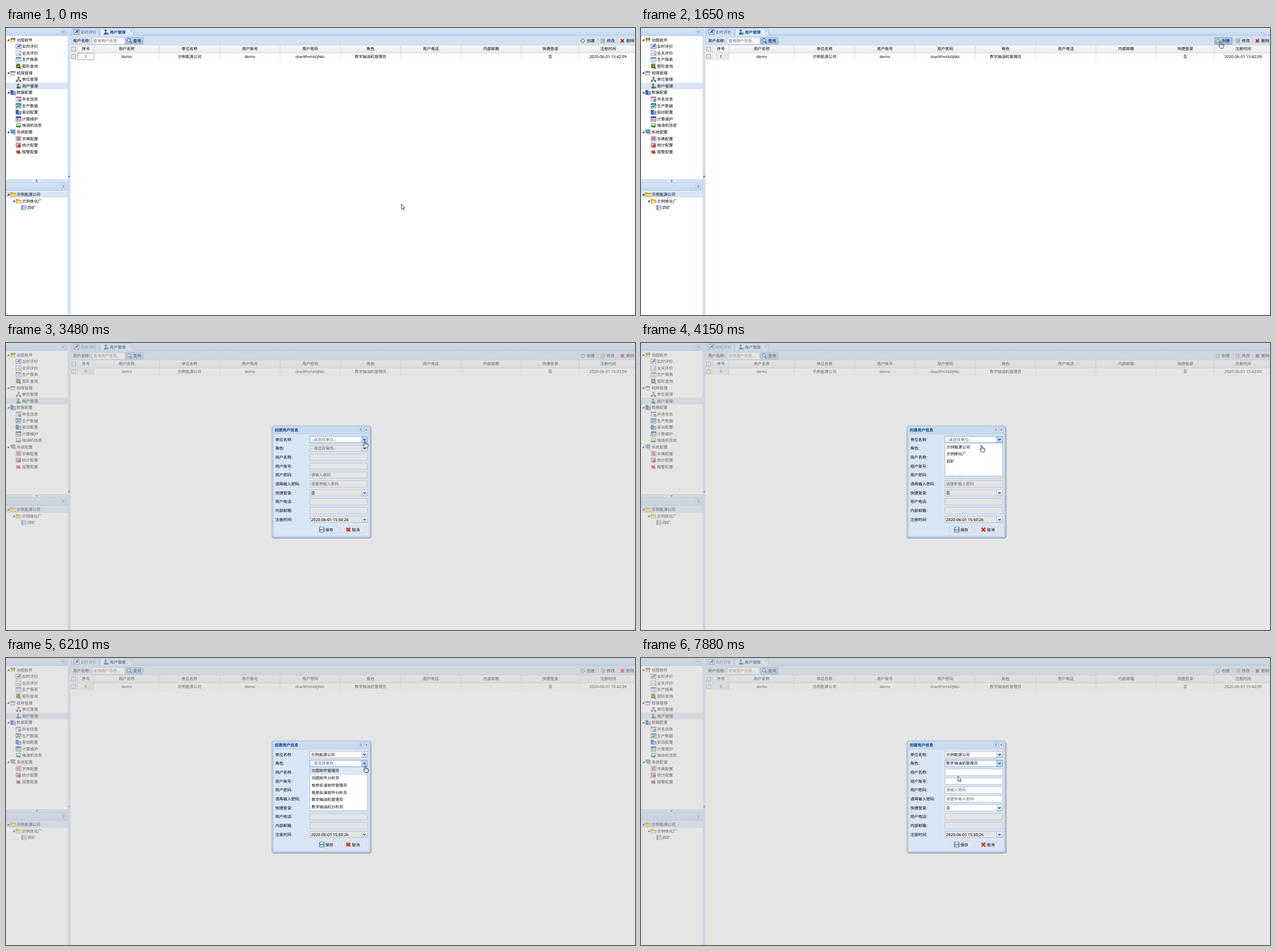
An HTML page that plays this animation: 1106x506 px, repeating every 8000 ms.

```html
<!DOCTYPE html>
<html lang="zh-CN">
<head>
<meta charset="utf-8">
<title>用户管理</title>
<style>
  html, body { margin: 0; width: 100%; height: 100%; overflow: hidden; background: #fff; }
  svg { display: block; }
  text { font: 6.96px "Noto Sans", "Noto Sans CJK SC", "Noto Sans CJK", sans-serif; fill: #000; white-space: pre; text-rendering: geometricPrecision; }
  .bold { font-weight: 700; }
  .mid { text-anchor: middle; }
  .hint { fill: #666; }
  .title { fill: #04408c; font-weight: 700; }
  .tab { fill: #2f5f9c; }
  .small { font-size: 6.5px; }
</style>
</head>
<body>
<svg id="stage" width="1106" height="506" viewBox="0 0 1106 506">
  <defs>
    <linearGradient id="bar" x2="0" y2="1"><stop stop-color="#d6e4f6"/><stop offset="1" stop-color="#c6d9f0"/></linearGradient>
    <linearGradient id="head" x2="0" y2="1"><stop stop-color="#fbfbfb"/><stop offset="1" stop-color="#e9eaec"/></linearGradient>
    <linearGradient id="num" x2="1" y2="0"><stop stop-color="#f7f7f7"/><stop offset="1" stop-color="#e4e5e7"/></linearGradient>
    <linearGradient id="press" x2="0" y2="1"><stop stop-color="#b6d0ee"/><stop offset="1" stop-color="#a0c2e9"/></linearGradient>
    <linearGradient id="trig" x2="0" y2="1"><stop stop-color="#fafcfe"/><stop offset="1" stop-color="#c3d4ea"/></linearGradient>
    <clipPath id="freshClip"><rect id="fresh" x="530" y="160" width="112" height="0"/></clipPath>
  </defs>
</svg>
<script>
const LOOP = 8000;
const stage = document.getElementById('stage');
const COMPANY = '示例能源公司', PLANT = '示例炼化厂', ACCOUNT = 'demo';

const rect = (x, y, w, h, fill, stroke, extra = '') =>
  `<rect x="${x}" y="${y}" width="${w}" height="${h}" fill="${fill}" ${stroke ? `stroke="${stroke}" stroke-width=".7"` : ''} ${extra}/>`;
const text = (x, cy, s, cls = '', extra = '') => `<text x="${x}" y="${cy + 2.5}" class="${cls}" ${extra}>${s}</text>`;
const path = (d, fill, stroke = 'none', w = 1) => `<path d="${d}" fill="${fill}" stroke="${stroke}" stroke-width="${w}"/>`;
const group = (id, body, extra = '') => `<g id="${id}" ${extra}>${body}</g>`;

// Icons live in a 10 x 10 box.
const sheet = color => rect(.5, .8, 9, 8.4, '#fff', color);
const art = {
  live: sheet('#1f3f9c') + path('M1.5 8C3 3 6 1 9 1.5L7 5Z', '#2462d4') + path('M5 6L8 4 7.5 8Z', '#e05038'),
  day: sheet('#4a74b4') + path('M1.5 8L4 4.5 5.5 6 8.5 2', 'none', '#c8782a') + rect(5.5, 6, 4, 3.5, '#e5a840'),
  report: sheet('#3a74b8') + rect(.5, .8, 9, 2.4, '#4a90d8') + path('M2 5H8M2 7H8', 'none', '#7fa6d2'),
  find: rect(1, .5, 7, 8, '#e0a83c', '#6a5420') + '<circle cx="4.6" cy="5" r="2.8" fill="#6fb45c" stroke="#222"/>' + path('M6.5 7L9.3 9.7', 'none', '#222', 1.3),
  soft: rect(.5, 1, 3.6, 4, '#ee4424') + rect(.5, 5, 3.6, 4, '#f3c020') + path('M7 9V3M5 4L7 1 9 4Z', '#2f8f2f', '#2f8f2f', 1.2),
  rights: rect(.5, 2.5, 7, 6.5, '#f4f7fc', '#33568f') + rect(.5, 2.5, 7, 2, '#4674bf') + path('M5 4.5L9.5 1V5Z', '#dd9526'),
  org: rect(3.4, .5, 3.4, 3.2, '#bd3c24') + path('M5 4V6M2 7V5.6H8V7', 'none', '#333', .8) + rect(.3, 6.5, 3.4, 3, '#bd3c24') + rect(6.3, 6.5, 3.4, 3, '#2c55a0'),
  user: '<circle cx="4.3" cy="2.6" r="2" fill="#44698f"/>' + path('M1 9.5C1 4 8 4 8 9.5Z', '#33597f') + rect(6, 6, 3.5, 3.5, '#5f955b'),
  data: rect(.4, 1, 4.4, 7.5, '#3a68c8', '#1a388a') + rect(4.6, 3, 5, 6.3, '#dfe9fb', '#1a388a') + path('M5.5 5H9M5.5 7H9', 'none', '#2a54b0'),
  well: sheet('#5484c0') + rect(.5, .8, 9, 2.2, '#dc5444') + rect(4.8, 4.6, 4.8, 5, '#3aa2ce') + path('M2 5H4M2 7H4', 'none', '#8aa'),
  output: rect(.5, 1, 9, 8.3, '#eef4ee', '#1c3c64') + rect(.5, 1, 9, 2, '#264f8c') + path('M1.5 8L4 5 6 7 8.5 4', 'none', '#1f8632', 1.7),
  calc: rect(.6, .8, 8.8, 8.5, '#e7edfb', '#12226a') + rect(.6, .8, 8.8, 2.4, '#1a3899') + path('M2 5H5M2 7H5', 'none', '#264692') + rect(6, 5, 2.5, 3, '#e09a20'),
  pump: rect(1.5, 1, 7.5, 5, '#dcebdc', '#3b733b') + path('M.5 6H6V4.5L9.5 7.2 6 9.8V8.4H.5Z', '#2b8f2b'),
  system: rect(1, .8, 7.5, 5.5, '#5fa6e4', '#38506c') + rect(3, 6.5, 3.5, 1.4, '#6a7684') + path('M5 9.5L9.5 6V9.5Z', '#cc983a'),
  dict: sheet('#8f5a8a') + path('M1.5 2.8H8.5M1.5 5H8.5M1.5 7.2H8.5', 'none', '#c04058', 1.4) + path('M3.5 1V9M6.4 1V9', 'none', '#6a7ad0', .8),
  stats: rect(.6, 1, 8, 7.8, '#a0a9b6', '#6c7582') + '<circle cx="6.4" cy="6.3" r="3" fill="#d03a2e"/>' + rect(2, 2.5, 3, 2, '#e6eaf0'),
  alarm: path('M1 2L5 4 8 .8 7.5 5 9.5 7 6 9.5 4 7.5 1.5 9Z', '#d03a20') + rect(4.4, 3, 2.2, 3.2, '#2d4596') + rect(1, 7.2, 3, 2, '#e9a23a'),
  folder: path('M.4 1.8H4L5 3H9.6V9H.4Z', '#e5b53c', '#96731c', .7) + path('M.6 8.8L2 4.6H9.8L9 8.8Z', '#fadc74'),
  leaf: rect(1, 1, 8, 8, '#e9f0fb', '#4a70a8') + rect(1, 1, 2.6, 8, '#6d95ce') + path('M5 3.6H8M5 6H8', 'none', '#4a70a8'),
  lens: '<circle cx="4" cy="4" r="3" fill="#e3f1ff" stroke="#3a6cb0" stroke-width="1.2"/>' + path('M6.2 6.2L9.3 9.3', 'none', '#5b5030', 1.7),
  plus: path('M3.5 1H6.5V3.5H9V6.5H6.5V9H3.5V6.5H1V3.5H3.5Z', '#e9f6e2', '#4b8f45', 1.1),
  edit: rect(1, 1, 7, 8.4, '#f5f1dc', '#56688a') + path('M2.5 3.5H6M2.5 5.5H5', 'none', '#6880a8') + path('M4 8L8.8 2.4', 'none', '#c47e20', 1.7),
  cross: path('M1.6 1.6L8.4 8.4M8.4 1.6L1.6 8.4', 'none', '#cc2a1a', 2.7),
  save: rect(.5, .5, 9, 9, '#4b86d6', '#28569c', 'rx=".8"') + rect(2, .8, 6, 3.2, '#f2f7ff') + rect(1.8, 5.6, 6.4, 3.6, '#cfe3b4')
};
const icon = (name, cx, cy, size = 10) => `<g transform="translate(${cx - size / 2} ${cy - size / 2}) scale(${size / 10})">${art[name]}</g>`;

const tool = (cx, cy, d) => rect(cx - 4, cy - 4, 8, 8, '#e3edf9', '#8fb0da', 'rx="1.2"') +
  `<g transform="translate(${cx} ${cy})">${path(d, 'none', '#2f588c', .9)}</g>`;
const LEFT = 'M-.3 -2L-2.2 0 -.3 2M2.2 -2L.3 0 2.2 2', DOWN = 'M-2 -2.2L0 -.3 2 -2.2M-2 .3L0 2.2 2 .3';
const UP = 'M-2 -.3L0 -2.2 2 -.3M-2 2.2L0 .3 2 2.2', CLOSE = 'M-2 -2L2 2M2 -2L-2 2';

const opener = (x, y) => path(`M${x - 2} ${y + 1.8}H${x + 1.8}V${y - 2}Z`, '#222');
function node(depth, y, name, label, leaf) {
  const x = 12.5 + depth * 9.5;
  return (leaf ? '' : opener(x - 8.5, y)) + icon(name, x, y, 9.6) + text(x + 6.3, y, label);
}

const MENU = [
  ['soft', '功图软件'], ['live', '实时评价', 1], ['day', '全天评价', 1], ['report', '生产报表', 1], ['find', '图形查询', 1],
  ['rights', '权限管理'], ['org', '单位管理', 1], ['user', '用户管理', 1],
  ['data', '数据配置'], ['well', '井名信息', 1], ['output', '生产数据', 1], ['data', '驱动配置', 1], ['calc', '计算维护', 1], ['pump', '抽油机信息', 1],
  ['system', '系统配置'], ['dict', '字典配置', 1], ['stats', '统计配置', 1], ['alarm', '报警配置', 1]
];

function sidebar() {
  const line = '#99bce8';
  return rect(0, 0, 112.5, 506, '#dfe9f6') + rect(0, 0, 109, 506, '#fff') +
    rect(0, 0, 109, 13.4, 'url(#bar)') + rect(0, 13, 109, .7, line) + tool(101, 6.8, LEFT) +
    rect(0, 96.4, 109, 11.6, '#dbe5f2') +
    MENU.map(([name, label, leaf], i) => node(leaf ? 1 : 0, 21 + i * 11.6, name, label, leaf)).join('') +
    rect(0, 267.6, 109, 4.4, '#dfe9f6') + rect(0, 267.4, 109, .7, line) +
    rect(45, 268.2, 18, 3, '#fff', '#c3d3e6') + path('M52 268.7H56L54 270.9Z', '#333') +
    rect(0, 272, 109, 14.8, 'url(#bar)') + rect(0, 271.6, 109, .7, line) + rect(0, 286.4, 109, .7, line) + tool(101, 279, DOWN) +
    rect(0, 287.6, 109, 11.6, '#d9e5f4') +
    node(0, 293.4, 'folder', COMPANY) + node(1, 305, 'folder', PLANT) + node(2, 316.6, 'leaf', '四矿', 1) +
    rect(108.8, 0, .7, 506, line) + rect(112, 0, .8, 506, line) + path('M111.6 260V264L109.6 262Z', '#333');
}

function tabs() {
  const shape = (x, w) => `M${x} 13V3Q${x} 1 ${x + 2} 1H${x + w - 2}Q${x + w} 1 ${x + w} 3V13`;
  return rect(112.5, 0, 994, 13, 'url(#bar)') + rect(112.5, 12.6, 994, 2.6, '#c9dcf2') + rect(112.5, 12.3, 994, .6, '#99bce8') +
    path(shape(116, 47.5), '#d3e2f5', '#8db2e3', .7) + icon('live', 124, 7) + text(131, 7, '实时评价', 'tab') +
    path(shape(165.5, 58.5), '#e0ecfa', '#8db2e3', .7) + icon('user', 176, 7) + text(182.5, 7, '用户管理', 'title') +
    path('M218.6 3.6L221.4 6.4M221.4 3.6L218.6 6.4', 'none', '#7b99bf', .8);
}

function toolbar() {
  const action = (x, name, label) => icon(name, x, 22.7, 8.4) + text(x + 7, 22.7, label);
  return rect(112.5, 15.2, 994, 15, '#d3e1f1') + text(118, 22.7, '用户名称:') +
    rect(151.3, 17, 57.5, 11.4, '#fff', '#b5b8c8') + text(153.5, 22.7, '查询用户信息...', 'hint') +
    rect(210.4, 16.8, 30.6, 11.8, 'url(#press)', '#7394c4', 'rx="1.3"') + icon('lens', 217, 22.5, 9) + text(223.5, 22.7, '查询') +
    group('createOver', rect(1008.6, 16.8, 30.6, 11.8, 'url(#press)', '#4f78b0', 'rx="1.3"')) +
    action(1014.3, 'plus', '创建') + action(1049.6, 'edit', '修改') + action(1083.8, 'cross', '删除') +
    rect(1041, 18, .7, 9, '#a9bfda') + rect(1075, 18, .7, 9, '#a9bfda');
}

const EDGES = [113, 126, 155, 269.5, 376, 482, 588, 694, 800, 906, 1008, 1110];
const HEADS = ['', '序号', '用户名称', '单位名称', '用户账号', '用户密码', '角色', '用户电话', '内部邮箱', '快捷登录', '注册时间'];
const CELLS = ['', '1', ACCOUNT, COMPANY, ACCOUNT, 'dow9Pmhb0JN6c', '数字抽油机管理员', '', '', '否', '2020-06-01 15:42:09'];

function grid() {
  const box = y => rect(115.5, y - 3.6, 7.2, 7.2, '#f6f6f6', '#777') + rect(117, y - 2.1, 4.2, 4.2, '#e3e5e8');
  let out = rect(112.8, 30, 994, 14, 'url(#head)') + rect(112.8, 29.8, 994, .7, '#c0c8d2') + rect(112.8, 43.7, 994, .7, '#c9c9c9') +
    rect(113, 44.3, 42, 12.2, 'url(#num)') + rect(112.8, 56.2, 994, .5, '#ededed') + box(37.2) + box(50.4) +
    group('cellFocus', rect(126.4, 44.6, 28.2, 11.4, '#fbfbfb', '#858585'));
  HEADS.forEach((head, i) => {
    const mid = i === 10 ? 1058.7 : (EDGES[i] + EDGES[i + 1]) / 2;
    out += rect(EDGES[i + 1] - .4, 30, .7, 14, '#c5c5c5') + rect(EDGES[i + 1] - .4, 44, .7, 12.4, '#d8d8d8') +
      text(mid, 36.8, head, 'mid') + text(mid, 50.2, CELLS[i], i === 5 ? 'mid small' : 'mid');
  });
  return out;
}

const FIELDS = [
  ['单位名称', '', 1], ['角色', '', 1], ['用户名称', ''], ['用户账号', ''], ['用户密码', '请输入密码'],
  ['请再输入密码', '请重新输入密码'], ['快捷登录', '否', 1], ['用户电话', ''], ['内部邮箱', ''], ['注册时间', '2020-06-01 15:50:26', 1]
];
const fieldY = i => 170.2 + i * 15.65;
const arrowDown = y => path(`M628.2 ${y - 1.2}L630.3 ${y + 1} 632.4 ${y - 1.2}`, 'none', '#1f3f6e', 1.3);
const focusRing = (id, i) => group(id, rect(534.4, fieldY(i) - 5.7, 101.2, 11.4, 'none', '#6fa0d8') +
  rect(625.6, fieldY(i) - 5.4, 9.7, 10.8, '#bfd8f5', '#6fa0d8') + arrowDown(fieldY(i)));

function dialog() {
  const boxes = fill => FIELDS.map((f, i) => rect(534.4, fieldY(i) - 5.7, 101.2, 11.4, fill, '#b0b7c6')).join('');
  const button = (x, w, name, label) => rect(x, 323, w, 12, '#dde6f1', '#ced9e7', 'rx="1.3"') + icon(name, x + 13, 329, 9.4) + text(x + 19.3, 329, label);
  return rect(468.5, 148, 174.5, 197, '#000', '', 'rx="4" opacity=".13"') + rect(467, 146.2, 175.5, 198.6, '#000', '', 'rx="4" opacity=".14"') +
    rect(467.9, 146, 173.2, 197, '#cbdaee', '#8ba5c8', 'rx="3"') + rect(470.5, 160.6, 168, 180, '#d9e6f5', '#b4c9e4') +
    text(472.3, 153.4, '创建用户信息', 'title') + tool(623.8, 153.2, UP) + tool(633.6, 153.2, CLOSE) +
    boxes('#e5e5e5') + group('freshFields', boxes('#fff'), 'clip-path="url(#freshClip)"') +
    FIELDS.map(([label, value, combo], i) => {
      const y = fieldY(i);
      return text(473.6, y, label + ':') + text(536.6, y, value, i === 4 || i === 5 ? 'hint' : '') +
        (combo ? rect(625.6, y - 5.4, 9.7, 10.8, 'url(#trig)', '#b0b7c6') + arrowDown(y) : '');
    }).join('') +
    focusRing('focusUnit', 0) + focusRing('focusRole', 1) +
    text(536.6, fieldY(0), '', '', 'id="unit"') + text(536.6, fieldY(1), '', '', 'id="role"') +
    button(542.3, 42, 'save', '保存') + button(589, 43, 'cross', '取消');
}

const ROW = 12.75;
const list = (id, top, height, items) => group(id, rect(534.4, top, 101.2, height, '#fff', '#8fb3dc') +
  rect(534.9, top + .4, 100.2, ROW, '#dfe8f6', '#b3cdec', `id="${id}Hover"`) +
  items.map((s, i) => text(537.2, top + 6.8 + i * ROW, s)).join(''));

const cursors =
  group('arrow', path('M.3 .3V9.4L2.4 7.5 3.9 10.8 5.3 10.2 3.8 7H6.6Z', '#fff', '#111', .7)) +
  group('hand', path('M-1 1C-1 -.2 1 -.2 1 1V5L2.3 4.8 3.7 5.2 5.2 5.9Q5.9 6.3 5.7 8L4.7 12.3H-.4L-3 8Q-3.5 6.4 -2.3 6.6L-1 7.8Z', '#fff', '#111', .8) +
    path('M1 5V7.2M2.6 5.2V7.3M4.1 5.6V7.5', 'none', '#111', .5)) +
  group('beam', path('M-1.8 -4.2Q0 -4.4 0 -3.4Q0 -4.4 1.8 -4.2M0 -3.6V3.6M-1.8 4.2Q0 4.4 0 3.4Q0 4.4 1.8 4.2', 'none', '#111', .9));

stage.innerHTML += sidebar() + tabs() + toolbar() + grid() +
  group('modal', rect(0, 0, 1106, 506, '#ccc', '', 'opacity=".5"') + dialog()) +
  list('units', 176.4, 58.2, [COMPANY, PLANT, '四矿']) +
  list('roles', 192, 77.2, ['功图软件管理员', '功图软件分析员', '电参反演软件管理员', '电参反演软件分析员', '数字抽油机管理员', '数字抽油机分析员']) +
  group('cursor', cursors);

// Pointer steps: time, shape, x, y
const POINTER = [
  [0, 'arrow', 695, 310], [770, 'arrow', 735, 270], [890, 'arrow', 835, 192], [1020, 'arrow', 935, 112], [1140, 'arrow', 996, 63],
  [1290, 'arrow', 1008, 42], [1410, 'hand', 1016, 26], [1530, 'hand', 1018, 24], [1650, 'hand', 1019, 23.5], [2020, 'arrow', 1019, 23],
  [2430, 'arrow', 867, 88], [2580, 'arrow', 802, 113], [2700, 'arrow', 746, 134], [2820, 'arrow', 700, 152], [2940, 'arrow', 665, 166],
  [3060, 'arrow', 648, 172], [3210, 'arrow', 635, 172], [3360, 'hand', 631, 172.5], [4030, 'hand', 617, 177], [4150, 'hand', 599, 180],
  [4300, 'hand', 598, 182], [4450, 'hand', 597, 183], [4720, 'beam', 595, 185], [5000, 'beam', 614.6, 185.2], [5150, 'beam', 618, 185.6],
  [5270, 'beam', 622, 186], [5390, 'beam', 625.5, 186.4], [5540, 'hand', 630, 189], [5660, 'hand', 631.5, 189.5], [6330, 'hand', 620, 199.5],
  [6480, 'hand', 606, 214], [6630, 'hand', 594, 240], [6780, 'hand', 588, 246], [6900, 'hand', 586, 249], [7330, 'beam', 590.5, 248.6],
  [7730, 'beam', 578, 235.5], [7880, 'arrow', 557, 208]
];
const FRESH = [[0, 0], [3480, 176.2], [4720, 235], [7330, 270]];
const ROLE_ROW = [[0, 0], [6480, 1], [6630, 3], [6780, 4]];

const $ = id => document.getElementById(id);
const at = (steps, t) => steps.filter(s => s[0] <= t).pop();
const show = (id, on) => { $(id).style.display = on ? '' : 'none'; };
function fill(id, value, hint, chosen) {
  $(id).textContent = chosen ? value : hint;
  $(id).setAttribute('class', chosen ? '' : 'hint');
}

function draw(t) {
  const within = (a, b) => t >= a && t < b;
  const [, shape, x, y] = at(POINTER, t);
  $('cursor').setAttribute('transform', `translate(${x} ${y})`);
  ['arrow', 'hand', 'beam'].forEach(id => show(id, id === shape));
  show('cellFocus', t < 1290);
  show('createOver', within(1410, 2020));
  show('modal', t >= 2020);
  show('focusUnit', within(3480, 5540));
  show('focusRole', t >= 5540);
  show('units', within(3600, 4720));
  show('unitsHover', t >= 4450);
  show('roles', within(5810, 7330));
  $('rolesHover').setAttribute('y', 192.4 + at(ROLE_ROW, t)[1] * ROW);
  $('fresh').setAttribute('height', Math.max(0, at(FRESH, t)[1] - 160));
  fill('unit', COMPANY, '--请选择单位--', t >= 4720);
  fill('role', '数字抽油机管理员', '--请选择角色--', t >= 6900);
}

const start = performance.now();
function tick() {
  draw((performance.now() - start) % LOOP);
  requestAnimationFrame(tick);
}
tick();
</script>
</body>
</html>
```
